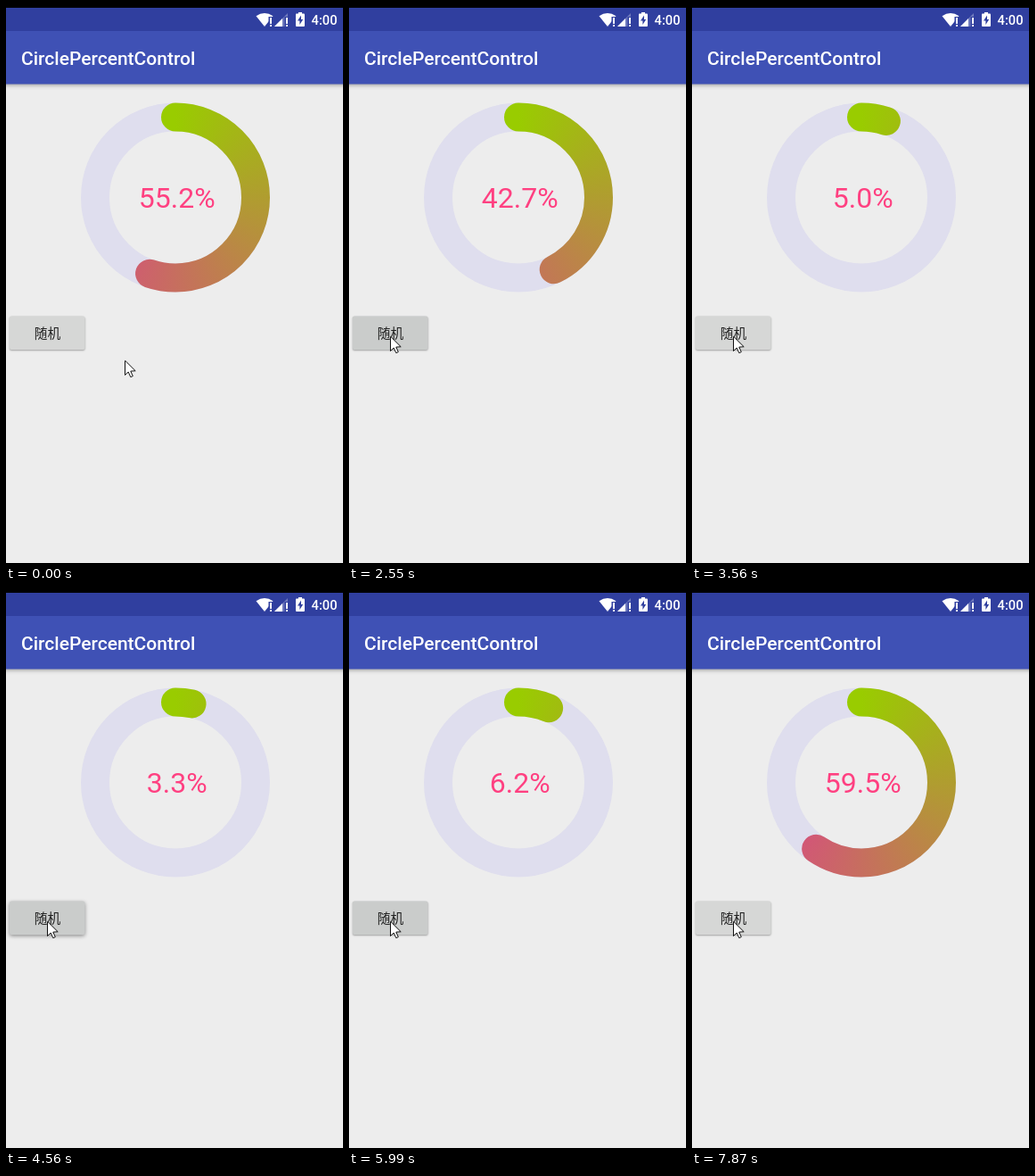
Write an HTML page with a canvas that moves like this. It is 378 by 624 pixels and loops after 8000 ms.

```html
<!DOCTYPE html>
<html lang="en">
<head>
<meta charset="utf-8">
<title>Circle percent control</title>
<style>
  html, body { margin: 0; width: 100%; height: 100%; overflow: hidden; background: #ededed; }
  canvas { display: block; }
</style>
</head>
<body>
<canvas id="stage" width="378" height="624"></canvas>
<script>
const ctx = document.getElementById('stage').getContext('2d');
const LOOP = 8000;
const MS_PER_PERCENT = 28.2;
const RING = { x: 190, y: 214.5, radius: 90, width: 32 };

const TICKS = [0, 870, 1010, 1130, 1250, 2270, 2400, 2550, 2710, 2860, 2980, 3130, 3260,
  3410, 3560, 3690, 3840, 4560, 4680, 4820, 4980, 5750, 5870, 5990, 6140,
  6850, 6970, 7090, 7240, 7360, 7480, 7630, 7750, 7870];

const SWEEPS = [
  { start: 2362, from: 55.2, to: 3.3 },
  { start: 4615, from: 3.3, to: 15.1 },
  { start: 5797, from: 15.1, to: 5.3 },
  { start: 6932, from: 5.3, to: 95.4 }
];

const PRESSES = [2270, 4560, 5750, 6850];

const POINTER = [
  { at: 0, x: 133, y: 397 },
  { at: 870, x: 124, y: 395 },
  { at: 1010, x: 99, y: 387 },
  { at: 1130, x: 65, y: 376 },
  { at: 1250, x: 46, y: 370 }
];

const last = (list, test) => list.filter(test).pop();

function percentAt(t) {
  const sweep = last(SWEEPS, s => s.start <= t);
  if (!sweep) return SWEEPS[0].from;
  const span = sweep.to - sweep.from;
  const x = Math.min(1, (t - sweep.start) / (Math.abs(span) * MS_PER_PERCENT));
  return sweep.from + span * (1 - (1 - x) ** 2);
}

function mixColor(f) {
  const from = [153, 204, 0], to = [244, 16, 190];
  return `rgb(${from.map((c, i) => Math.round(c + (to[i] - c) * f)).join()})`;
}

const ringPaint = ctx.createConicGradient(-Math.PI / 2, RING.x, RING.y);
ringPaint.addColorStop(0, mixColor(0));
ringPaint.addColorStop(0.9, mixColor(0.9));
ringPaint.addColorStop(0.9, mixColor(0));
ringPaint.addColorStop(1, mixColor(0));

function rect(x, y, w, h, color) {
  ctx.fillStyle = color;
  ctx.fillRect(x, y, w, h);
}

function polygon(points, color) {
  ctx.beginPath();
  points.forEach(([x, y]) => ctx.lineTo(x, y));
  ctx.closePath();
  ctx.fillStyle = color;
  ctx.fill();
}

function text(string, x, y, font, color, align = 'left') {
  ctx.font = font;
  ctx.fillStyle = color;
  ctx.textAlign = align;
  ctx.fillText(string, x, y);
}

function alertMark(x, top) {
  rect(x - 1.5, top - 1, 4.5, 24 - top, '#303f9f');
  rect(x, top, 2, 7, '#fff');
  rect(x, 21, 2, 2, '#fff');
}

function drawStatusIcons() {
  ctx.beginPath();
  ctx.moveTo(290, 23);
  ctx.lineTo(280.5, 11.3);
  ctx.quadraticCurveTo(290, 4.5, 299.5, 11.3);
  ctx.closePath();
  ctx.fillStyle = '#fff';
  ctx.fill();
  alertMark(296, 13);

  polygon([[301, 23], [316, 23], [316, 8]], 'rgba(255,255,255,.3)');
  polygon([[301, 23], [310, 23], [310, 14]], '#fff');
  alertMark(314, 13);

  rect(328, 7, 4, 2, '#fff');
  ctx.beginPath();
  ctx.roundRect(325, 8.5, 10, 14.5, 1);
  ctx.fill();
  polygon([[331, 10.5], [327, 16.5], [329.4, 16.5], [329.4, 21], [333.2, 15], [331, 15]], '#303f9f');
}

function drawBars() {
  ctx.save();
  ctx.shadowColor = 'rgba(0,0,0,.38)';
  ctx.shadowBlur = 5;
  ctx.shadowOffsetY = 1.5;
  rect(-10, 28, 398, 59.5, '#3f51b5');
  ctx.restore();
  rect(0, 0, 378, 28, '#303f9f');
  rect(0, 0, 378, 2, '#000');
  drawStatusIcons();
  text('4:00', 371.5, 21, '500 14.7px Roboto, sans-serif', '#fff', 'right');
  text('CirclePercentControl', 17, 66, '500 21px Roboto, sans-serif', '#fff');
}

function arc(turn, paint) {
  ctx.beginPath();
  ctx.arc(RING.x, RING.y, RING.radius, -Math.PI / 2, (turn * 2 - 0.5) * Math.PI);
  ctx.strokeStyle = paint;
  ctx.lineWidth = RING.width;
  ctx.lineCap = 'round';
  ctx.stroke();
}

function drawRing(percent) {
  arc(1, '#dfdeee');
  arc(percent / 100, ringPaint);
  text(percent.toFixed(1) + '%', 191.7, 226, '32px Roboto, sans-serif', '#ff4081', 'center');
}

function drawButton(t) {
  const press = last(PRESSES, p => p <= t);
  const age = press === undefined ? Infinity : t - press;
  const raised = age < 200;
  ctx.save();
  ctx.shadowColor = raised ? 'rgba(0,0,0,.4)' : 'rgba(0,0,0,.32)';
  ctx.shadowBlur = raised ? 4 : 2;
  ctx.shadowOffsetY = raised ? 1.5 : 1;
  ctx.fillStyle = age < 380 ? '#cacccb' : '#d6d7d6';
  ctx.beginPath();
  ctx.roundRect(4, 347.5, 84.5, 37.5, 2);
  ctx.fill();
  ctx.restore();
  text('随机', 46.5, 372, '500 14.7px "Noto Sans CJK SC", "Noto Sans CJK", sans-serif', '#212121', 'center');
}

function drawPointer(t) {
  const { x, y } = last(POINTER, p => p.at <= t);
  ctx.save();
  ctx.translate(x + 0.5, y + 0.5);
  polygon([[0, 0], [0, 16], [3.7, 12.5], [6.3, 18.2], [8.8, 17.1], [6.3, 11.6], [11.3, 11.3]], '#fff');
  ctx.strokeStyle = '#111';
  ctx.lineWidth = 1;
  ctx.stroke();
  ctx.restore();
}

function draw(now) {
  const t = last(TICKS, tick => tick <= now % LOOP);
  rect(0, 0, 378, 624, '#ededed');
  drawBars();
  drawRing(percentAt(t));
  drawButton(t);
  drawPointer(t);
}

const begin = performance.now();
function loop() {
  draw(performance.now() - begin);
  requestAnimationFrame(loop);
}
loop();
</script>
</body>
</html>
```
